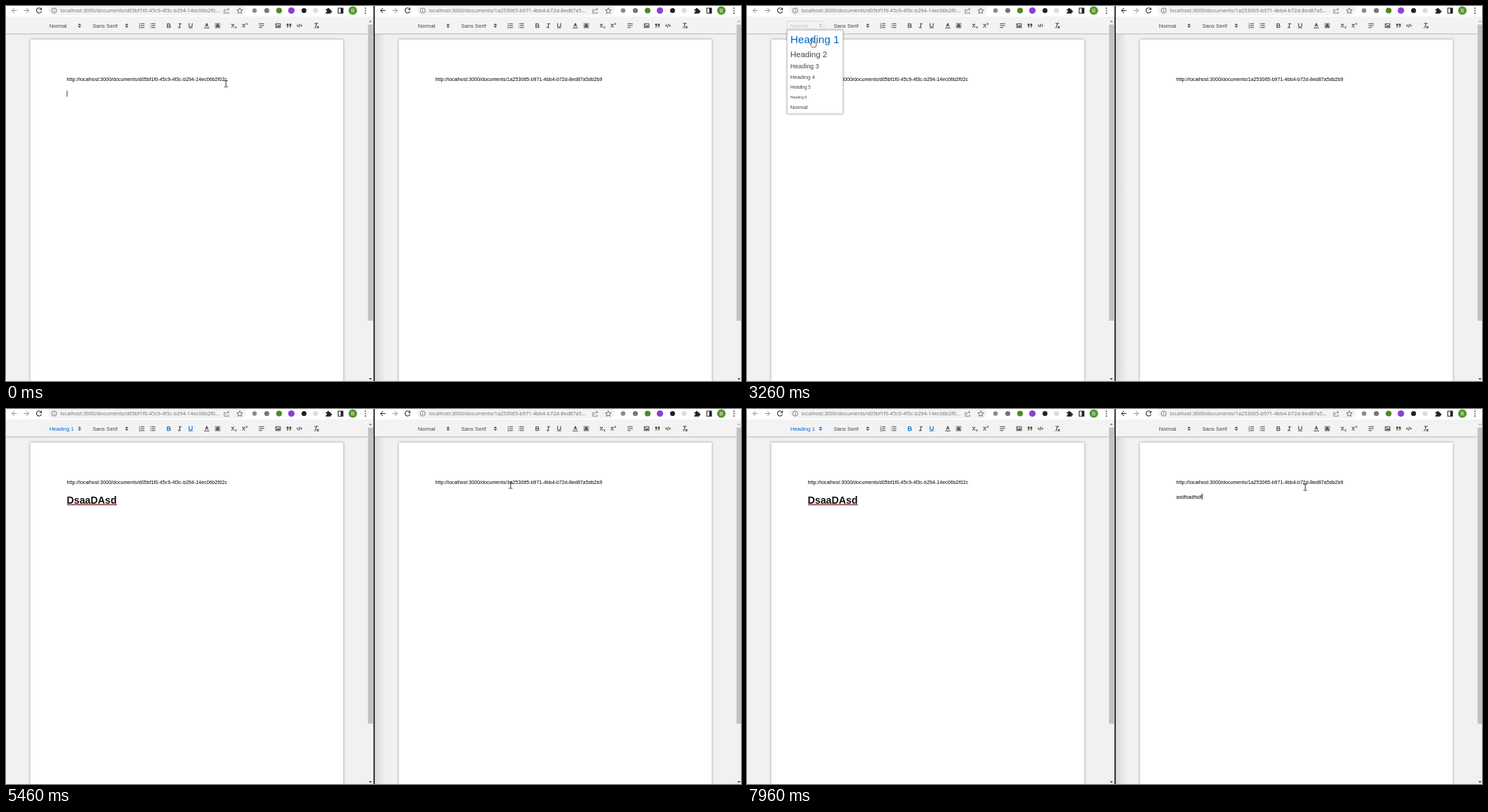
Animation, 1047 px wide and 535 px high, one loop 7990 ms. Source, as an HTML page:

```html
<!DOCTYPE html>
<html lang="en">
<head>
<meta charset="utf-8">
<title>Shared documents</title>
<style>
  html, body { margin: 0; width: 100%; height: 100%; overflow: hidden; background: #fff; }
  svg { display: block; width: 1047px; height: 535px; }
  text { white-space: pre; }
  .sans { font-family: "Liberation Sans", Arial, sans-serif; fill: currentColor; }
  .address { font: 7.33px "Open Sans", sans-serif; fill: #6a6e73; }
  .doc { font-size: 7.1px; color: #000; }
  .title { font-size: 14.2px; font-weight: bold; }
  .label { font-size: 7.65px; }
  .tool { color: #444; }
  .tool.on { color: #06c; }
  .tool.open { color: #c4c4c4; }
  .line { fill: none; stroke: currentColor; stroke-width: 2; stroke-linecap: round; stroke-linejoin: round; }
  .thin { stroke-width: 1; }
  .solid { fill: currentColor; }
  .raised { filter: drop-shadow(0 0 1.4px rgba(0, 0, 0, .45)); }
</style>
</head>
<body>
<svg id="stage" viewBox="0 0 1047 535"></svg>
<script>
const LOOP = 7990;
const BLUE = '#3390ff';
const stage = document.getElementById('stage');

const line = (d, extra = '') => `<path class="line ${extra}" d="${d}"/>`;
const solid = d => `<path class="solid" d="${d}"/>`;
const rect = (x, y, w, h, fill, extra = '') =>
  `<rect x="${x}" y="${y}" width="${w}" height="${h}" fill="${fill}" ${extra}/>`;
const dot = (x, y, r, fill) => `<circle cx="${x}" cy="${y}" r="${r}" fill="${fill}"/>`;
const text = (x, y, cls, content, extra = '') =>
  `<text x="${x}" y="${y}" class="${cls}" ${extra}>${content}</text>`;

// Toolbar glyphs, each on an 18 unit square: [centre x, drawing]
const cross = line('M2.5 5l6 8M8.5 5l-6 8');
const letterA = line('M5.5 11L9 3l3.5 8M11.6 9H6.4');
const tools = {
  ordered: [193.5, line('M7 4h8M7 9h8M7 14h8') + line('M2.5 3h1v3M2.5 8h2l-2 3h2M2.5 13h2v3h-2', 'thin')],
  bullet: [209, line('M6 4h9M6 9h9M6 14h9M3 4h0M3 9h0M3 14h0')],
  bold: [232, line('M5 4h4.5a2.5 2.5 0 0 1 0 5H5zM5 9h5.5a2.5 2.5 0 0 1 0 5H5z')],
  italic: [247.5, line('M7 4h6M5 14h6M8 14l2-10')],
  underline: [263, line('M5 3v6a4 4 0 0 0 8 0V3') + solid('M3 15h12v1H3z')],
  color: [286, letterA + line('M3 15h12')],
  background: [301.5, '<path class="solid" opacity=".45" d="M2 2h14v14H2z"/>' +
    line('M5.5 13L9 5l3.5 8M11.6 11H6.4')],
  sub: [325, cross + line('M12 11.5h3v1.8h-3v2.2h3', 'thin')],
  sup: [340.5, cross + line('M12 2.5h3v1.8h-3v2.2h3', 'thin')],
  align: [364, line('M3 4h12M3 9h12M3 14h7')],
  image: [387.5, line('M3 4h12v10H3z') + solid('M5 12v-1l2-2 1 1 3-3 2 2v3zM5 6h2v2H5z')],
  quote: [403, line('M4 5h3v3H4zM11 5h3v3h-3zM7 8c0 4-3 5-3 5M14 8c0 4-3 5-3 5') + solid('M4 5h3v3H4zM11 5h3v3h-3z')],
  code: [418, line('M5 7L3 9l2 2M13 7l2 2-2 2M10 5L8 13')],
  clean: [442, line('M5 3h8M6.5 13L9.3 4M11 11l4 4M15 11l-4 4') + solid('M2 14h7v1H2z')]
};

const glyph = (x, y, content) =>
  `<g transform="translate(${x - 4.91} ${y - 4.91}) scale(.546)">${content}</g>`;
const pickerArrows = x =>
  glyph(x, 28, '<path class="solid line thin" style="fill:currentColor" d="M6 11l3 3 3-3zM6 7l3-3 3 3z"/>');

function browserBar(address, canGoBack) {
  const ink = '#333', pale = '#8f9296';
  const stroke = (d, color, width = 1) =>
    `<path d="${d}" fill="none" stroke="${color}" stroke-width="${width}" stroke-linejoin="round"/>`;
  return rect(0, 0, 525, 15, '#fff') +
    rect(60, -3, 282, 16.5, '#f1f3f4', 'rx="8"') +
    stroke('M15.5 6.5H8.5M12 3L8.5 6.5 12 10', canGoBack ? '#222' : pale) +
    stroke('M25.5 6.5h7M29 3l3.5 3.5L29 10', pale) +
    stroke('M50 4.3a3.6 3.6 0 1 0 .5 3.2M50.5 2.5v2.8h-2.8', ink, 1.1) +
    stroke('M72.2 6.5a3.6 3.6 0 1 0-7.2 0 3.6 3.6 0 1 0 7.2 0M68.6 6v2.5M68.6 4.2v.9', '#5f6368', .8) +
    text(77.5, 9.3, 'address', address) +
    stroke('M312.5 5h-1.7v5.2h6.5V8.4M312.8 8c.3-2.5 2-3.5 4.6-3.5M315.8 2.6l2 1.9-2 1.9', '#666', .8) +
    stroke('M333 2.6l1.2 2.8 3 .2-2.3 2 .7 2.9-2.6-1.6-2.6 1.6.7-2.9-2.3-2 3-.2z', '#555', .8) +
    dot(354, 6.5, 3.2, '#8a8a8a') + dot(371.5, 6.5, 3.6, '#777') + dot(389, 6.5, 4.1, '#4b8b24') +
    dot(406.5, 6.5, 4.6, '#8d3fd1') + dot(424.5, 6.5, 3.5, '#222') + dot(441, 6.5, 3.6, '#ddd') +
    '<path fill="#222" d="M455.5 4.5h2.3a1.3 1.3 0 1 1 2.4 0h2.3v2.2a1.3 1.3 0 1 1 0 2.4v1.6h-7V8.6a1.2 1.2 0 1 0 0-2.2z"/>' +
    stroke('M473.2 3h6.8v7.2h-6.8z', '#222', 1.1) + rect(476.8, 3, 3.2, 7.2, '#222') +
    dot(494, 6.5, 6.1, '#57972d') +
    text(494, 9, 'sans', 'B', 'font-size="7" text-anchor="middle" color="#fff"') +
    [3.2, 6.6, 10].map(y => dot(512, y, .9, '#333')).join('');
}

function pane(id, x, address, canGoBack) {
  const buttons = Object.entries(tools).map(([name, [cx, art]]) =>
    `<g class="tool" id="${id}-${name}">${glyph(cx, 28, art)}</g>`).join('');
  return `<g transform="translate(${x})">` +
    rect(0, 0, 525, 535, '#f1f1f1') +
    (x ? rect(0, 40, 16, 495, 'url(#edge)') : '') +
    rect(34.5, 47.7, 446, 500, '#fff', 'class="raised"') +
    rect(0, 12, 525, 27, '#f3f3f3', 'class="raised"') +
    `<g class="tool" id="${id}-picker">` +
    `<rect id="${id}-frame" x="57.3" y="21.8" width="52.5" height="12.6" fill="none" stroke="#ccc" stroke-width=".6" visibility="hidden"/>` +
    text(61.8, 30.8, 'sans label', 'Normal', `id="${id}-style"`) + pickerArrows(104.7) + '</g>' +
    '<g class="tool">' + text(123.5, 30.8, 'sans label', 'Sans Serif') + pickerArrows(172) + '</g>' +
    buttons +
    rect(515, 15, 8.6, 520, '#f1f1f1') + rect(515.7, 26.5, 7, 422.5, '#c1c1c1') +
    `<path d="M516.8 23l2.3-2.5 2.3 2.5z" fill="${x ? '#b5b5b5' : '#888'}"/>` +
    '<path d="M516.8 531l2.3 2.5 2.3-2.5z" fill="#444"/>' +
    browserBar(address, canGoBack) +
    '</g>';
}

// Style menu entries: [label, font size, baseline]
const styles = [['Heading 1', 15.3, 53.2], ['Heading 2', 11.48, 73], ['Heading 3', 8.95, 89.2],
  ['Heading 4', 7.65, 104], ['Heading 5', 6.35, 118.2], ['Heading 6', 5.1, 132.4], ['Normal', 7.65, 146.8]];
const menu = '<g id="menu">' +
  rect(57.3, 34.5, 79.2, 119, '#fff', 'class="raised" stroke="#ccc" stroke-width=".6"') +
  styles.map(([label, size, y], i) =>
    text(61.8, y, 'sans', label, `font-size="${size}" color="${i ? '#444' : '#06c'}"`)).join('') + '</g>';

const LEFT = 86.6, RIGHT = 611.6;
const leftId = 'd05bf1f0-45c9-4f3c-b294-14ec06b2f02c';
const rightId = '1a253065-b971-4bb4-b72d-8ed87a5db2b9';
const link = id => 'http://localhost:3000/documents/' + id;
const leftWord = 'DsaaDAsd', rightWord = 'asdfsadfsdf';

stage.innerHTML =
  `<defs>
    <linearGradient id="edge"><stop stop-color="#d8d8d8"/><stop offset="1" stop-color="#f1f1f1"/></linearGradient>
    <clipPath id="picked"><rect id="pickedArea" x="741.6" y="100" height="9.6"/></clipPath>
  </defs>` +
  pane('left', 0, 'localhost:3000/documents/' + leftId.slice(0, 34) + '...', false) +
  pane('right', 525, 'localhost:3000/documents/' + rightId.slice(0, 31) + '...', true) +
  rect(523.6, 0, 1.6, 535, '#000') +
  text(LEFT, 107.2, 'sans doc', link(leftId)) +
  text(RIGHT, 107.2, 'sans doc', link(rightId)) +
  `<g clip-path="url(#picked)">${rect(740, 100, 60, 10, BLUE)}` +
  text(RIGHT, 107.2, 'sans doc', link(rightId), 'style="color:#fff"') + '</g>' +
  rect(86.8, 120.4, 34.2, 9.2, BLUE, 'id="wordMark"') +
  rect(86.8, 120.4, 71.2, 20, BLUE, 'id="titleMark"') +
  text(LEFT, 127.6, 'sans doc', '', 'id="word"') +
  rect(87, 128.1, 34, 1, '#b0284f', 'id="wordError"') +
  text(LEFT, 135, 'sans title', leftWord, 'id="title"') +
  rect(87, 135.7, 71, 1, '#111', 'id="underline"') +
  rect(87, 136.4, 71, .9, '#d0282d', 'id="titleError"') +
  text(RIGHT, 127.6, 'sans doc', '', 'id="reply"') +
  rect(0, 0, .8, 9, '#000', 'id="caret"') +
  menu +
  `<g id="pointer" fill="#fff" stroke="#222" stroke-width=".7" stroke-linejoin="round">
    <path id="beam" fill="none" stroke-width=".9" d="M-2.6-4.4H-.6L0-4 .6-4.4H2.6M0-4V4M-2.6 4.4H-.6L0 4 .6 4.4H2.6"/>
    <path id="hand" d="M-1 .8a1 1 0 0 1 2 0v3.6l3.6.8q1.4.4 1.2 1.9l-.7 3.3-.8 1.5H.2L-3.2 7.6q-.4-1.2 1-1.1L-1 7.4z"/>
    <path id="arrow" d="M0 0v8.6l2-1.8 1.3 3 1.3-.6-1.3-2.8h2.6z"/>
  </g>`;

const el = {};
stage.querySelectorAll('[id]').forEach(node => el[node.id] = node);
const show = (id, visible) => el[id].setAttribute('visibility', visible ? 'visible' : 'hidden');
const within = (t, from, to) => t >= from && t < to;
const typed = (word, t, start, step) => word.slice(0, Math.max(0, Math.floor((t - start) / step) + 1));

// Pointer path: [ms, x, y]
const path = [
  [0, 313.3, 111], [30, 313.3, 111], [400, 305, 106], [810, 276, 108], [1280, 111.8, 134.4], [1630, 111.8, 134.4],
  [1800, 114, 137], [2050, 110, 117], [2400, 109.5, 127.6], [2530, 109.5, 127.6], [2880, 86, 26],
  [3000, 86, 26], [3240, 93, 47], [3390, 93, 47], [3500, 95, 46], [3880, 231, 27], [4030, 232, 27],
  [4200, 250, 28], [4500, 261.7, 29], [4620, 261.7, 29], [4830, 250, 167], [5000, 252, 166],
  [5530, 741.6, 106], [5600, 741.6, 106], [5750, 774, 107], [5820, 780, 108], [5980, 802, 140],
  [6170, 830.6, 122.6], [6480, 864, 115], [6590, 865, 123], [6720, 865, 123], [6750, 873, 117],
  [6780, 866, 112.5], [7250, 866, 112.5], [7700, 800, 114], [7940, 795.2, 111.7], [LOOP, 795.2, 111.7]
];

function pointerAt(t) {
  const i = path.findIndex(point => point[0] > t);
  const [t0, x0, y0] = path[i - 1], [t1, x1, y1] = path[i];
  const u = (t - t0) / (t1 - t0), ease = u * u * (3 - 2 * u);
  return [x0 + (x1 - x0) * ease, y0 + (y1 - y0) * ease];
}

function drawPointer(x, y, open) {
  const onPage = y > 47 && (x > 34 && x < 481 || x > 559 && x < 1006);
  const kind = y < 38 || open ? 'hand' : onPage ? 'beam' : 'arrow';
  for (const name of ['beam', 'hand', 'arrow']) show(name, name === kind);
  el.pointer.setAttribute('transform', `translate(${x.toFixed(2)} ${y.toFixed(2)})`);
}

function drawCaret(t) {
  let place = null;
  if (t < 500 || within(t, 840, 1640)) place = [LEFT + el.word.getComputedTextLength(), 120.6];
  else if (within(t, 4850, 5350)) place = [158, 121, 18];
  else if (within(t, 6500, 7040)) place = [849.4, 100.2];
  else if (t >= 7250) place = [RIGHT + el.reply.getComputedTextLength(), 120.6];
  show('caret', place);
  if (!place) return;
  const [x, y, height = 8.8] = place;
  el.caret.setAttribute('x', x);
  el.caret.setAttribute('y', y);
  el.caret.setAttribute('height', height);
}

function draw(t) {
  const [x, y] = pointerAt(t);
  const open = within(t, 2930, 3450);
  const heading = t >= 3450;
  const hover = (cx, reach) => y < 38 && Math.abs(x - cx) < reach;

  el.word.textContent = heading ? '' : typed(leftWord, t, 840, 55);
  el.reply.textContent = typed(rightWord, t, 7330, 55);
  el.word.style.color = t >= 2150 ? '#fff' : '#000';
  el.title.style.color = t < 4850 ? '#fff' : '#111';
  show('wordMark', within(t, 2150, 3450));
  show('wordError', within(t, 2150, 3450));
  show('titleMark', within(t, 3450, 4850));
  for (const id of ['title', 'titleError']) show(id, heading);
  show('underline', t >= 4620);
  show('menu', open);
  show('left-frame', open);

  el['left-style'].textContent = heading ? 'Heading 1' : 'Normal';
  el['left-picker'].setAttribute('class', 'tool ' + (open ? 'open' : heading || hover(83, 26) ? 'on' : ''));
  for (const [name, [cx]] of Object.entries(tools)) {
    const active = name === 'bold' && t >= 3960 || name === 'underline' && t >= 4620;
    el['left-' + name].classList.toggle('on', active || hover(cx, 7.6));
  }

  const picked = within(t, 5600, 6500) ? Math.min(32.4, Math.max(0, x - 741.6)) : 0;
  el.pickedArea.setAttribute('width', picked);
  drawCaret(t);
  drawPointer(x, y, open);
}

function tick() {
  draw(performance.now() % LOOP);
  requestAnimationFrame(tick);
}
tick();
</script>
</body>
</html>
```
